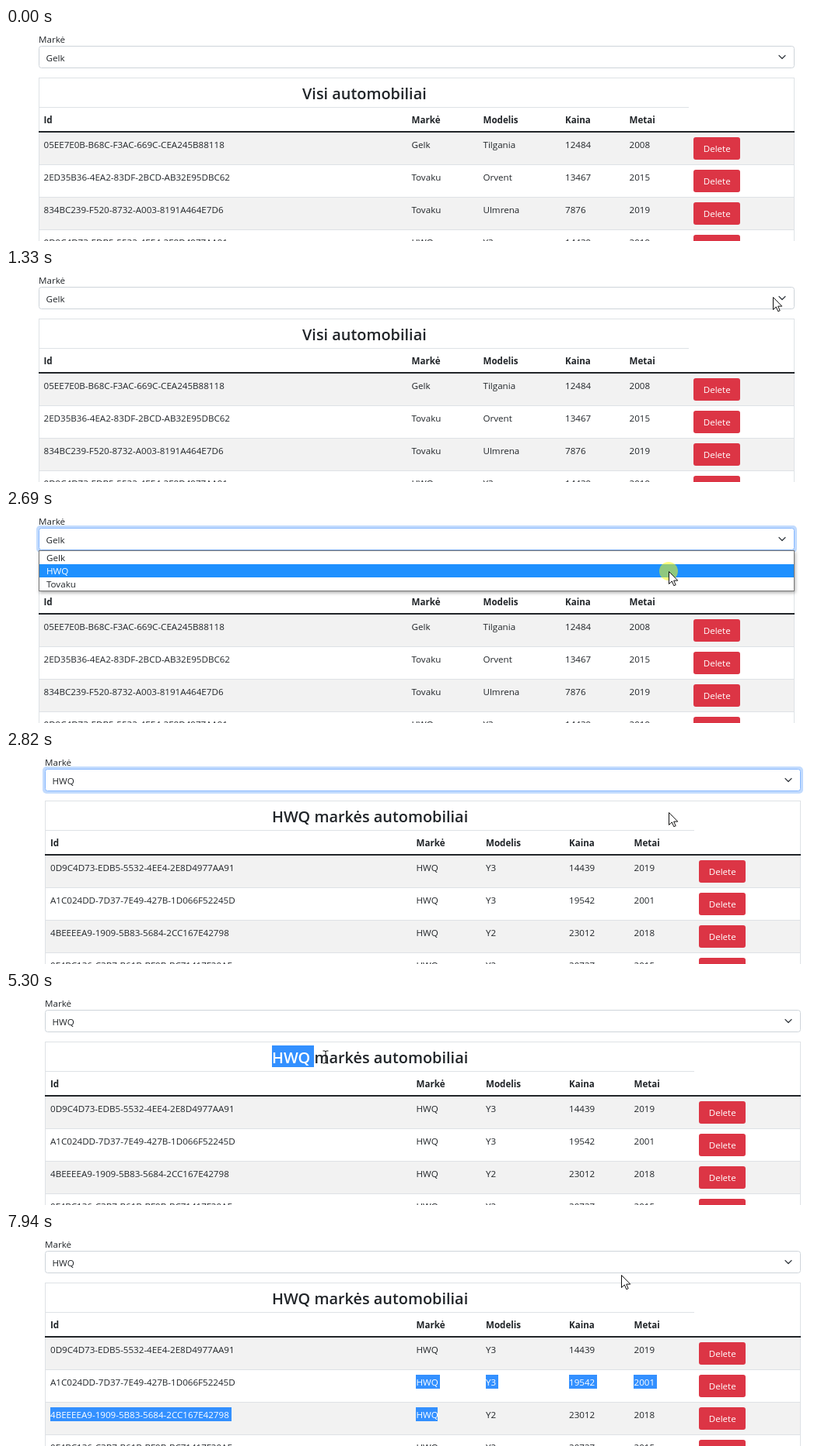
Recreate the animation shown at these times as an HTML page. Size 1057 px wide and 275 px high, loop 8 s.

```html
<!DOCTYPE html>
<html lang="lt">
<head>
<meta charset="utf-8">
<title>Automobiliai</title>
<style>
  html, body { margin: 0; width: 100%; height: 100%; overflow: hidden; background: #fff; }
  svg { display: block; width: 1057px; height: 275px; }
  text { font: 11.6px "Open Sans", "Noto Sans", sans-serif; fill: #212529; white-space: pre; }
  .title { font-size: 19.9px; font-weight: 600; }
  .head { font-weight: 700; }
  .light, .picked { fill: #fff; }
  .button { fill: #fff; font-weight: 500; }
</style>
</head>
<body>
<svg id="stage" viewBox="0 0 1057 275"></svg>
<script>
const stage = document.getElementById('stage');
const LOOP = 8000, START = 315, TICK = 67.2;
const BLUE = '#3390ff', LINE = '#dee2e6';
const MAKES = ['Gelk', 'HWQ', 'Tovaku'];
const HEADINGS = ['Id', 'Markė', 'Modelis', 'Kaina', 'Metai'];
const parseRows = lines => lines.map(line => line.split(' '));

const ALL_CARS = {
  left: 42, button: 884, titleX: 381, title: 'Visi automobiliai',
  columns: [48.5, 521.5, 613.5, 719, 801.5],
  rows: parseRows([
    '05EE7E0B-B68C-F3AC-669C-CEA245B88118 Gelk Tilgania 12484 2008',
    '2ED35B36-4EA2-83DF-2BCD-AB32E95DBC62 Tovaku Orvent 13467 2015',
    '834BC239-F520-8732-A003-8191A464E7D6 Tovaku Ulmrena 7876 2019',
    '0D9C4D73-EDB5-5532-4EE4-2E8D4977AA91 HWQ Y3 14439 2019'
  ])
};
const ONE_MAKE = {
  left: 50, button: 891, titleX: 342, title: 'HWQ markės automobiliai',
  columns: [57, 527.5, 617, 724, 807.5],
  rows: parseRows([
    '0D9C4D73-EDB5-5532-4EE4-2E8D4977AA91 HWQ Y3 14439 2019',
    'A1C024DD-7D37-7E49-427B-1D066F52245D HWQ Y3 19542 2001',
    '4BEEEEA9-1909-5B83-5684-2CC167E42798 HWQ Y2 23012 2018',
    '0F4BC136-C3B7-B61B-BF9B-BC71417F20AF HWQ Y2 20727 2015'
  ])
};

// Eased pointer moves; the pointer rests in between.
const ENTRY = { x: 890, y: 262 };
const MOVES = [
  { from: 0, to: 7, x: 933, y: 83 },
  { from: 7, to: 11, x: 1005, y: 34 },
  { from: 13, to: 17, x: 966, y: 38 },
  { from: 19, to: 24, x: 873, y: 65 },
  { from: 24, to: 27, x: 852, y: 79 },
  { from: 41, to: 50, x: 353, y: 89 },
  { from: 52, to: 62, x: 408, y: 83, drag: true },
  { from: 73, to: 85, x: 577, y: 151 },
  { from: 85, to: 89, x: 538, y: 190 },
  { from: 89, to: 92, x: 586, y: 196, drag: true },
  { from: 92, to: 95, x: 530, y: 194 },
  { from: 95, to: 99, x: 560, y: 235, drag: true },
  { from: 100, to: 111, x: 819, y: 58 },
  { from: 111, to: 113, x: 791, y: 54 }
];
const CLICKS = { open: 17, choose: 35, clear: 85 };
const [titleDrag, wordDrag, rowDrag] = MOVES.filter(move => move.drag);

const within = (value, first, last) => value >= first && value <= last;
const smooth = p => p * p * (3 - 2 * p);

function pointerAt(tick) {
  let { x, y } = ENTRY;
  for (const move of MOVES) {
    const part = Math.min(1, Math.max(0, (tick - move.from) / (move.to - move.from)));
    x += (move.x - x) * smooth(part);
    y += (move.y - y) * smooth(part);
  }
  return [x, y];
}

const pressed = tick => Object.values(CLICKS).includes(tick) ||
  MOVES.some(move => move.drag && within(tick, move.from + 1, move.to));

const rect = (x, y, w, h, fill, extra = '') =>
  `<rect x="${x}" y="${y}" width="${w}" height="${h}" fill="${fill}" ${extra}/>`;
const text = (x, y, string, style = '') => `<text x="${x}" y="${y}" class="${style}">${string}</text>`;

const pen = document.createElement('canvas').getContext('2d');
function textWidth(string, style) {
  pen.font = (style === 'title' ? '600 19.9px' : '11.6px') + ' "Open Sans", "Noto Sans", sans-serif';
  return pen.measureText(string).width;
}

function selectable(x, y, string, style, range) {
  if (!range) return text(x, y, string, style);
  const [from, to, pad = 0] = range;
  const picked = string.slice(from, to);
  const boxX = Math.floor(x + textWidth(string.slice(0, from), style));
  const [up, height] = style === 'title' ? [23, 28] : [14, 18];
  return rect(boxX, y - up, Math.round(textWidth(picked, style) + pad), height, BLUE) +
    text(x, y, `${string.slice(0, from)}<tspan class="picked">${picked}</tspan>${string.slice(to)}`, style);
}

function titleRange(tick) {
  if (!within(tick, titleDrag.from + 1, CLICKS.clear - 1)) return null;
  const part = (tick - titleDrag.from) / (titleDrag.to - titleDrag.from);
  return [0, Math.min(4, Math.round(4 * smooth(Math.min(1, part))))];
}

function cellRange(tick, row, column, length) {
  if (within(tick, wordDrag.from + 1, rowDrag.from - 1)) {
    return row === 1 && column === 1 ? [1, length] : null;
  }
  if (tick <= rowDrag.from) return null;
  if (row === 1 && column > 0 || row === 2 && column === 0) return [0, length, 3];
  return row === 2 && column === 1 && tick >= rowDrag.to ? [0, length] : null;
}

function drawSelect({ left }, value, focused) {
  const ring = focused ? rect(left - 3, 20, 978, 35, '#c2dbfe', 'rx="5"') : '';
  return text(left, 19, 'Markė') + ring +
    rect(left + .5, 23.5, 971, 28, '#fff', `rx="3" stroke="${focused ? '#86b7fe' : '#ced4da'}"`) +
    text(left + 9.5, 43, value) +
    `<path d="M${left + 952} 35.5l4 4 4-4" fill="none" stroke="#343a40" stroke-width="1.2" stroke-linecap="round" stroke-linejoin="round"/>`;
}

function drawTable(page, tick) {
  const { left, columns, button } = page;
  const chosen = page === ONE_MAKE;
  let out = '';
  page.rows.forEach((cells, row) => {
    const y = 135 + row * 42;
    out += rect(left, y, 972, 41, row % 2 ? '#fff' : '#f2f2f2') + rect(left, y + 41, 972, 1, LINE);
    cells.forEach((cell, column) => {
      out += selectable(columns[column], y + 20, cell, '', chosen && cellRange(tick, row, column, cell.length));
    });
    out += rect(button, y + 6, 60, 29, '#dc3545', 'rx="3"') + text(button + 12.7, y + 25, 'Delete', 'button');
  });
  out += rect(left, 64, 972, 1, LINE) + rect(left, 64, 1, 211, LINE) + rect(left + 971, 64, 1, 211, LINE) +
    rect(left, 102, button - 6 - left, 1, LINE) + rect(left, 133, 972, 2, '#212529');
  HEADINGS.forEach((name, i) => out += text(columns[i], 123, name, 'head'));
  return out + selectable(page.titleX, 92, page.title, 'title', chosen && titleRange(tick));
}

function drawMenu(active) {
  let out = rect(42.5, 52.5, 971, 52, '#fff', 'stroke="#767676" style="filter:drop-shadow(1px 2px 2px #0005)"');
  MAKES.forEach((make, i) => {
    if (i === active) out += rect(43, 53 + i * 17, 970, 17, '#1e90ff');
    out += text(52, 66 + i * 17, make, i === active ? 'light' : '');
  });
  return out;
}

function drawPointer(tick, page) {
  const [x, y] = pointerAt(tick);
  const overTitle = within(x, 342, 594) && within(y, 72, 98);
  const overMake = within(x, 527, 556) && within((y - 142) % 42, 0, 17);
  const shape = page === ONE_MAKE && (overTitle || overMake)
    ? '<path d="M-3.5-8h2.5l1 1 1-1h2.5M0-7v14M-3.5 8h2.5l1-1 1 1h2.5" fill="none" stroke="#111"/>'
    : '<path d="M.5.5v16l3.8-3.6 2.5 5.8 2.4-1-2.5-5.6h5.1z" fill="#fff" stroke="#111" stroke-linejoin="round"/>';
  const halo = pressed(tick) ? `<circle cx="${x}" cy="${y}" r="12" fill="#ff0" fill-opacity=".5"/>` : '';
  return halo + `<g transform="translate(${Math.round(x)} ${Math.round(y)})">${shape}</g>`;
}

function draw(tick) {
  const { open, choose } = CLICKS;
  const page = tick < choose + 2 ? ALL_CARS : ONE_MAKE;
  stage.innerHTML = drawTable(page, tick) +
    drawSelect(page, MAKES[tick > choose ? 1 : 0], within(tick, open, titleDrag.from)) +
    (within(tick, open + 1, choose) ? drawMenu(tick < 25 ? 0 : 1) : '') +
    (tick < 0 ? '' : drawPointer(tick, page));
}

const begin = performance.now();
let shown = null;
function frame() {
  const time = (performance.now() - begin) % LOOP;
  const tick = Math.max(-1, Math.floor((time - START) / TICK));
  if (tick !== shown) draw(shown = tick);
  requestAnimationFrame(frame);
}
frame();
</script>
</body>
</html>
```
